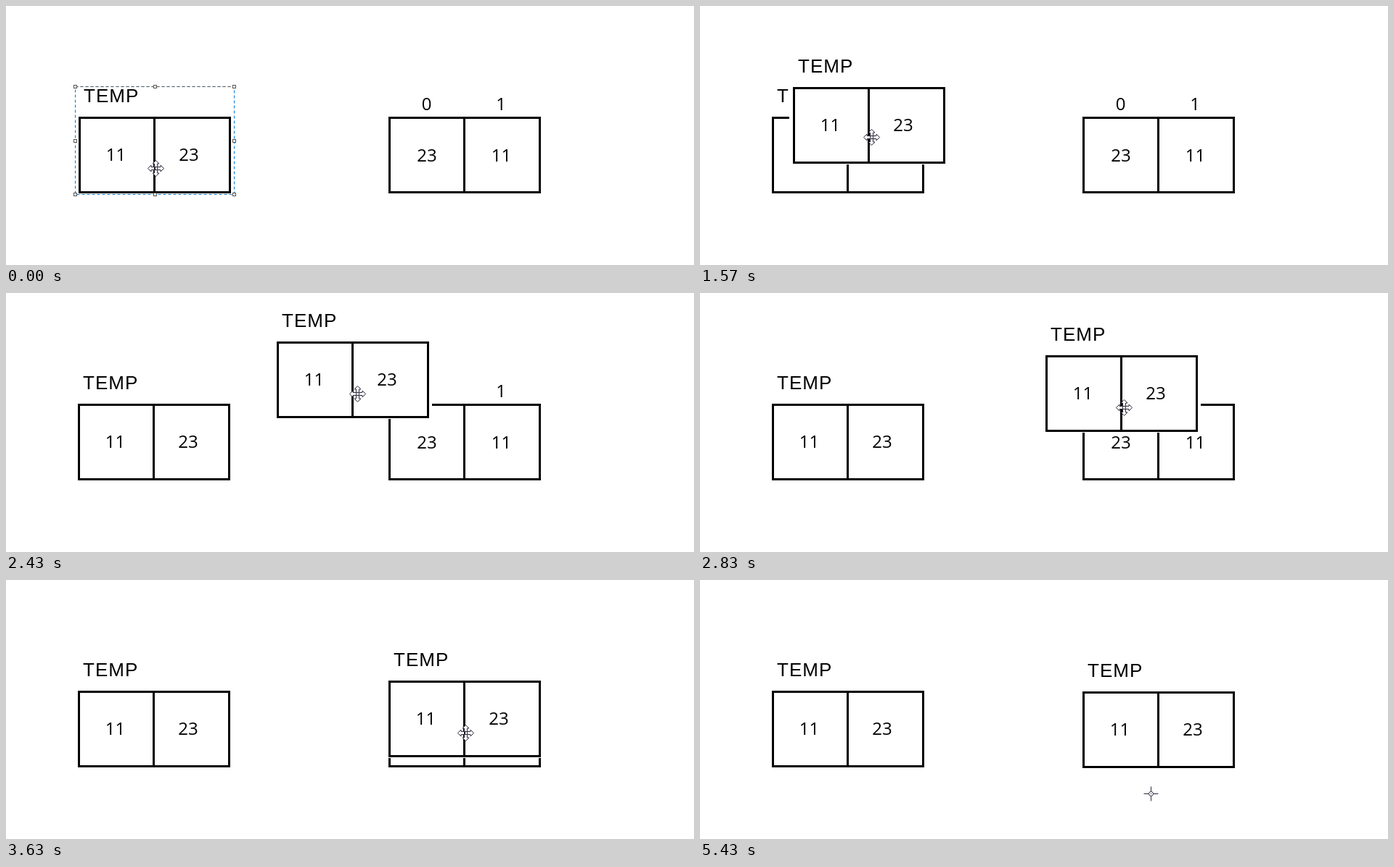
These frames come from a looping animation (948 px wide and 358 px high, 5560 ms). An HTML page with a canvas:

```html
<!DOCTYPE html>
<html lang="en">
<head>
<meta charset="utf-8">
<title>Array copy</title>
<style>
  html, body { margin: 0; width: 100%; height: 100%; overflow: hidden; background: #fff; }
  canvas { display: block; }
</style>
</head>
<body>
<canvas id="stage" width="948" height="358"></canvas>
<script>
const ctx = document.getElementById('stage').getContext('2d');
const LOOP = 5560, STEP = 100 / 3;
const HOME = { x: 99, y: 153 };
const ARROW = new Path2D('M0-11L4.5-6.5H2V-2H-2V-6.5H-4.5Z');

// Key points of the drag
const path = [
  { t: 1237, x: 1, y: 0 },
  { t: 1570, x: 29, y: -41 },
  { t: 2030, x: 137, y: -84 },
  { t: 2200, x: 198, y: -93 },
  { t: 2370, x: 256, y: -88 },
  { t: 2830, x: 377, y: -67 },
  { t: 3500, x: 425, y: -25 },
  { t: 3630, x: 428, y: -14 },
  { t: 3970, x: 431, y: 0 },
  { t: 4200, x: 428, y: 1 }
];

const smooth = u => u * u * (3 - 2 * u);
const clamp = u => Math.min(1, Math.max(0, u));

function secant(i, axis) {
  const a = path[i], b = path[i + 1];
  return a && b ? (b[axis] - a[axis]) / (b.t - a.t) : 0;
}

function slope(i, axis) {
  const a = secant(i - 1, axis), b = secant(i, axis);
  return a * b > 0 ? 2 * a * b / (a + b) : 0;
}

// Monotone cubic through the key points, held at both ends
function along(t, axis) {
  const next = path.findIndex(p => p.t > t);
  const i = next < 0 ? path.length - 2 : Math.max(0, next - 1);
  const a = path[i], b = path[i + 1], d = b.t - a.t, u = clamp((t - a.t) / d);
  return a[axis] + (b[axis] - a[axis]) * smooth(u)
    + d * u * (1 - u) * ((1 - u) * slope(i, axis) - u * slope(i + 1, axis));
}

const place = t => ({
  x: HOME.x + Math.round(along(t, 'x')),
  y: HOME.y + Math.round(along(t, 'y'))
});

function digits(s, x, y) {
  ctx.font = '24px "Open Sans", "Noto Sans", sans-serif';
  ctx.textAlign = 'center';
  ctx.fillText(s, x, y);
}

function boxes(x, y) {
  ctx.fillStyle = ctx.strokeStyle = '#000';
  ctx.lineWidth = 3;
  ctx.strokeRect(x + 1.5, y + 1.5, 207, 103);
  ctx.fillRect(x + 103, y, 3, 106);
}

function temp({ x, y }) {
  boxes(x, y);
  ctx.font = '26px "Liberation Sans", Arial, sans-serif';
  ctx.textAlign = 'left';
  ctx.letterSpacing = '1px';
  ctx.fillText('TEMP', x + 7, y - 20);
  ctx.letterSpacing = '0px';
  digits('11', x + 51.5, y + 61);
  digits('23', x + 152, y + 61);
}

function line(x1, y1, x2, y2) {
  ctx.beginPath();
  ctx.moveTo(x1, y1);
  ctx.lineTo(x2, y2);
  ctx.stroke();
}

function marquee({ x, y }) {
  ctx.save();
  ctx.translate(x - 4.5, y - 41.5);
  ctx.lineWidth = 1;
  ctx.setLineDash([4, 3]);
  ctx.strokeStyle = '#0078d7';
  ctx.strokeRect(0, 0, 219, 149);
  ctx.strokeStyle = '#555';
  line(0, 0, 219, 0);
  ctx.setLineDash([]);
  ctx.fillStyle = '#fff';
  for (let i = 0; i < 9; i++) {
    if (i === 4) continue;
    const hx = Math.round(i % 3 * 109.5) - 2, hy = Math.round(Math.floor(i / 3) * 74.5) - 2;
    ctx.fillRect(hx, hy, 4, 4);
    ctx.strokeRect(hx, hy, 4, 4);
  }
  ctx.restore();
}

function pointer(x, y, cross) {
  ctx.save();
  ctx.translate(x + .5, y + .5);
  ctx.lineWidth = 1;
  ctx.fillStyle = '#fff';
  ctx.strokeStyle = '#2c2c3c';
  for (let i = 0; i < 4; i++) {
    if (cross) {
      line(0, -10, 0, -3);
    } else {
      ctx.fill(ARROW);
      ctx.stroke(ARROW);
    }
    ctx.rotate(Math.PI / 2);
  }
  if (cross) {
    ctx.beginPath();
    ctx.arc(0, 0, 3, 0, 7);
    ctx.stroke();
    ctx.strokeRect(0, 0, .1, .1);
  }
  ctx.restore();
}

function draw(t) {
  ctx.fillStyle = '#fff';
  ctx.fillRect(0, 0, 948, 358);
  temp(HOME);
  boxes(527, 153);
  digits('0', 579.5, 144);
  digits('1', 682, 144);
  digits('23', 580, 215);
  digits('11', 682.5, 215);

  const copy = place(t), hand = place(t + 16);
  ctx.fillStyle = '#fff';
  ctx.fillRect(copy.x - 5, copy.y - 42, 219, 149);
  temp(copy);
  if (t < 1070 || t >= 5030 && t < 5430) marquee(copy);

  // After the drop the pointer leaves the selection
  const out = smooth(clamp((t - 5130) / 240));
  const px = Math.round(hand.x + 106 - 12 * out);
  const py = Math.round(hand.y + 71 + 70 * out);
  pointer(px, py, py > 262);
}

const start = performance.now();
function tick() {
  const t = (performance.now() - start) % LOOP;
  const frame = Math.floor((t + 5) / STEP);
  draw(Math.round(frame * STEP / 10) * 10);
  requestAnimationFrame(tick);
}
tick();
</script>
</body>
</html>
```
